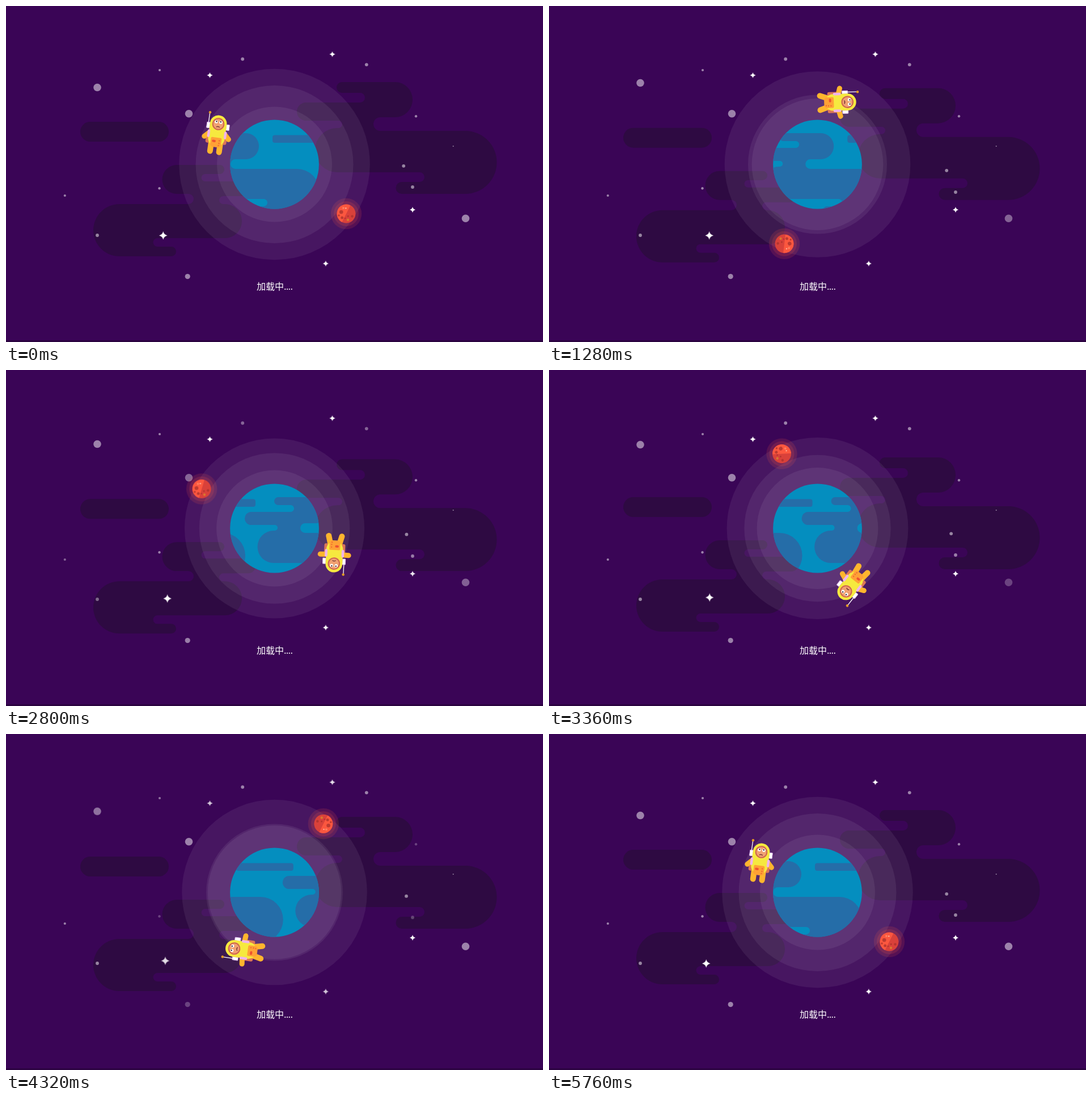
Write an HTML page that moves like this. It is 947 px wide and 592 px high and loops after 5.84 s.

```html
<!DOCTYPE html>
<html lang="zh">
<head>
<meta charset="utf-8">
<title>加载中</title>
<style>
@property --swing { syntax: "<number>"; inherits: true; initial-value: 0; }
:root { --loop: 5760ms linear infinite; }
html, body { margin: 0; width: 100%; height: 100%; overflow: hidden; background: #3a0556; }
svg { display: block; width: 100vw; height: 100vh; }
text { font: 16px "Noto Sans CJK SC", "Noto Sans CJK", "Noto Sans", sans-serif; fill: #fff; }
.dots { letter-spacing: -.65px; }

.clouds { fill: #2e0a42; animation: clouds var(--loop); }
@keyframes clouds {
  0%, 100% { translate: 0 0; }
  50% { translate: 0 24px; }
  0%, 50% { animation-timing-function: cubic-bezier(.37, 0, .63, 1); }
}

.halo { fill: #fff; fill-opacity: .065; }
.outer { animation: outer var(--loop); }
.middle { animation: middle var(--loop); }
.inner { animation: inner var(--loop); }
@keyframes outer {
  0%, 100% { r: 168.3px; }
  50% { r: 158.3px; }
  0%, 50% { animation-timing-function: cubic-bezier(.37, 0, .63, 1); }
}
@keyframes middle {
  0%, 100% { r: 139px; }
  25%, 75% { r: 120.5px; }
  50% { r: 133.5px; }
  0%, 50% { animation-timing-function: ease-in; }
  25%, 75% { animation-timing-function: ease-out; }
}
@keyframes inner {
  0%, 50%, 100% { r: 101.5px; }
  25%, 75% { r: 117.7px; }
  0%, 50% { animation-timing-function: ease-in; }
  25%, 75% { animation-timing-function: ease-out; }
}

.land { fill: #256da8; animation: scroll 5782ms linear infinite; }
@keyframes scroll { to { translate: 254px 0; } }

.orbit, .spin { animation: turn var(--loop); }
.pilot { transform-origin: 473.5px 279px; }
.moon { transform-origin: 476px 282.2px; }
.spin { transform-origin: 600px 366px; }
@keyframes turn { to { rotate: 360deg; } }

.body { animation: swing var(--loop); }
@keyframes swing {
  0%, 100% { --swing: 0; }
  22.2% { --swing: .8; }
  37.5%, 87.5% { --swing: 1; }
  58.3% { --swing: .3; }
  75% { --swing: .52; }
}
.limb { stroke: #ffb52e; stroke-linecap: round; }
.arm { stroke-width: 9; rotate: calc(45deg - 75deg * var(--swing)); }
.leg { stroke-width: 10; rotate: calc(24deg * var(--swing)); }

.dot { fill: #fff; fill-opacity: .5; --low: .5; }
.spark { fill: #fff; --low: .78; }
.a { animation: twice var(--loop); }
.b { animation: once var(--loop); }
.c { animation: thrice var(--loop); }
.d { animation: late var(--loop); }
@keyframes twice {
  0%, 22%, 58%, 75%, 100% { opacity: 1; }
  37.5%, 87.5% { opacity: var(--low); }
}
@keyframes once {
  0%, 22%, 58%, 100% { opacity: 1; }
  37.5%, 87.5% { opacity: .94; }
  75% { opacity: var(--low); }
}
@keyframes thrice {
  0%, 37.5%, 75%, 100% { opacity: 1; }
  22.2% { opacity: .75; }
  58.3%, 87.5% { opacity: var(--low); }
}
@keyframes late {
  0%, 58%, 100% { opacity: 1; }
  75% { opacity: .87; }
  87.5% { opacity: var(--low); }
}
.rise { animation: rise var(--loop); }
.sink { animation: sink var(--loop); }
.loop { animation: loop var(--loop); }
.glide { animation: glide var(--loop); }
@keyframes rise {
  0%, 100% { translate: 0 0; }
  22.2% { translate: 0 -8px; }
  40% { translate: 0 -14px; }
  58.3% { translate: 0 -12px; }
  75% { translate: 0 -7.3px; }
}
@keyframes sink {
  0%, 100% { translate: 0 0; }
  22.2% { translate: 0 9px; }
  37.5% { translate: 0 11px; }
  58.3% { translate: 0 7px; }
}
@keyframes loop {
  0%, 100% { translate: 0 0; }
  22.2% { translate: 0 8px; }
  37.5% { translate: 2px 9.5px; }
  58.3% { translate: 8px 6.5px; }
}
@keyframes glide {
  0%, 100% { translate: 0 0; }
  22.2% { translate: 5.5px 0; }
  37.5% { translate: 9px .5px; }
  58.3% { translate: 6px -3.5px; }
  75% { translate: 3.7px -4.7px; }
}
</style>
</head>
<body>
<svg viewBox="0 0 947 592">
  <defs>
    <clipPath id="globe"><circle cx="473.5" cy="279" r="78.4"/></clipPath>
    <clipPath id="disc"><circle r="16.5"/></clipPath>
    <path id="spark" d="M0-5.2Q.9-.9 5.2 0Q.9.9 0 5.2Q-.9.9-5.2 0Q-.9-.9 0-5.2z"/>
    <path id="land" d="M357 224H423a23 23 0 0 1 0 46H404.5a8.5 8.5 0 0 0 0 17H513a40 40 0 0 1 0 80H434a7 7 0 0 1 0-14H454.5a6.5 6.5 0 0 0 0-13H349a28.5 28.5 0 0 1 0-57H351a5 5 0 0 0 0-10H309.5a11.5 11.5 0 0 1 0-23H379a6 6 0 0 0 0-12H357a7 7 0 0 1 0-14zM474 227.5H567a4 4 0 0 1 4 4V237a4 4 0 0 1-4 4H474a4 4 0 0 1-4-4V231.500a4 4 0 0 1 4-4z"/>
  </defs>

  <rect width="947" height="592" fill="#3a0556"/>
  <rect y="589" width="947" height="3" fill="#2c0441"/>

  <g class="clouds">
    <rect x="131" y="204" width="156" height="35" rx="17.5"/>
    <path d="M592.5 134H686a31 31 0 0 1 0 62H660a12 12 0 0 0 0 24H810a55.500 55.500 0 0 1 0 111H698a10.500 10.500 0 0 1 0-21H729.500a8.500 8.500 0 0 0 0-17H584a39 39 0 0 1 0-78H586.500a6.500 6.500 0 0 0 0-13H529a16 16 0 0 1 0-32H624.500a8.500 8.500 0 0 0 0-17H592.500a9.500 9.500 0 0 1 0-19z"/>
    <path d="M301 280H377a8 8 0 0 1 0 16H351a6.500 6.500 0 0 0 0 13H427a13 13 0 0 1 0 26H383a7 7 0 0 0 0 14H386a30 30 0 0 1 0 60H267a7.500 7.500 0 0 0 0 15H291.500a8.500 8.500 0 0 1 0 17H200a46 46 0 0 1 0-92H322a9 9 0 0 0 0-18H301a25.500 25.500 0 0 1 0-51z"/>
  </g>

  <g class="halo">
    <circle class="outer" cx="473.5" cy="279" r="168.3"/>
    <circle class="middle" cx="473.5" cy="279" r="139"/>
    <circle class="inner" cx="473.5" cy="279" r="101.5"/>
  </g>

  <g class="dot">
    <g class="rise"><circle class="d" cx="161" cy="143.5" r="6.8"/></g>
    <circle class="a" cx="322.5" cy="189.7" r="6.8"/>
    <circle class="d" cx="271" cy="113" r="2.1"/>
    <circle class="a" cx="417.2" cy="93.5" r="2.9"/>
    <circle class="a" cx="635.8" cy="103.3" r="2.9"/>
    <circle class="b" cx="723" cy="194.3" r="2.2"/>
    <circle cx="788.7" cy="247" r="1"/>
    <circle class="loop" cx="701.2" cy="281.8" r="2.9"/>
    <g class="sink"><circle class="b" cx="717" cy="319" r="2.9"/></g>
    <circle class="c" cx="810.5" cy="374.2" r="6.8"/>
    <circle class="b" cx="320.2" cy="476.5" r="4.6"/>
    <circle class="a" cx="161" cy="404" r="2.9"/>
    <circle class="a" cx="103.8" cy="334" r="2.1"/>
    <circle class="b" cx="270.5" cy="321.2" r="2.2"/>
  </g>
  <g class="spark">
    <use class="b" href="#spark" x="359.5" y="122"/>
    <use class="d" href="#spark" x="575.5" y="85"/>
    <use class="a" href="#spark" x="717" y="359"/>
    <use class="b" href="#spark" x="563.8" y="453.8"/>
    <g class="glide"><use class="d" href="#spark" transform="translate(277.2 404.3) scale(1.4)"/></g>
  </g>

  <g clip-path="url(#globe)">
    <rect x="395" y="200" width="158" height="158" fill="#048ebf"/>
    <g class="land">
      <use href="#land"/>
      <use href="#land" x="-254"/>
    </g>
  </g>

  <g class="orbit moon"><g class="spin"><g transform="translate(600 366)">
    <circle r="27.200" fill="#ff5a40" fill-opacity=".14"/>
    <circle r="22" fill="#ff5a40" fill-opacity=".16"/>
    <g clip-path="url(#disc)">
      <circle r="17" fill="#d9413a"/>
      <path d="M9-18L-9 18H-20V-18z" fill="#fb573f"/>
      <g fill="#a8302b" fill-opacity=".75">
        <circle cx="-8.800" cy="-3" r="3.300"/>
        <circle cx="-7.300" cy="7" r="2.500"/>
        <circle cx="3.200" cy="4.300" r="1.500"/>
        <circle cx="10.500" cy="4.500" r="2.200"/>
        <circle cx="-13" cy="3" r="1.700"/>
        <circle cx="-2" cy="8" r="1.300"/>
      </g>
      <circle cx="3" cy="10.700" r="2.200" fill="#d9772f"/>
      <circle cx="-.7" cy="-9.700" r="1.200" fill="#ffb39a"/>
      <circle cx="-5" cy="-10" r="2" fill="#ff7d5c"/>
    </g>
  </g></g></g>

  <g class="orbit pilot"><g class="body" transform="translate(374.500 208) rotate(8)">
    <g fill="#dc7658">
      <rect x="-18.500" y="17" width="8" height="18" rx="3"/>
      <rect x="10.500" y="17" width="8" height="18" rx="3"/>
    </g>
    <g class="limb">
      <g transform="translate(-13 16) scale(-1 1)"><path class="arm" d="M0 0H12"/></g>
      <g transform="translate(13 16)"><path class="arm" d="M0 0H12"/></g>
      <g transform="translate(-8 35)"><path class="leg" d="M0 0V14"/></g>
      <g transform="translate(8 35) scale(-1 1)"><path class="leg" d="M0 0V14"/></g>
    </g>
    <path d="M-17.500 0V-17" stroke="#fff" stroke-width="1.300"/>
    <circle cx="-17.300" cy="-18.500" r="2.300" fill="#e39a25"/>
    <g fill="#fff" stroke="#dcb6ec">
      <rect x="-20" y="-1" width="5.500" height="10" rx="1"/>
      <rect x="14.500" y="-1" width="5.500" height="10" rx="1"/>
    </g>
    <rect x="-14.800" y="-15.500" width="29.600" height="55" rx="14.800" fill="#f6e93f"/>
    <g fill="#f0b4ea">
      <rect x="-17" y="11.500" width="4.500" height="13.500" rx="2.200"/>
      <rect x="12.500" y="11.500" width="4.500" height="13.500" rx="2.200"/>
    </g>
    <path d="M-9.500 26a2 2 0 0 1 2-2H7.500a2 2 0 0 1 2 2V36a5 5 0 0 1-5 5H-4.500a5 5 0 0 1-5-5z" fill="#ffa136"/>
    <rect x="-7" y="28.500" width="6.500" height="4" rx="1.700" fill="#ee5330"/>
    <g fill="#ee6a30">
      <circle cx="5.700" cy="29" r="1.200"/>
      <circle cx="5.700" cy="33.500" r="1.200"/>
      <circle cx="5.200" cy="37.500" r="1.200"/>
    </g>
    <circle r="10.800" fill="#cf6450"/>
    <circle r="8.800" fill="#f0a172"/>
    <g fill="#fff">
      <circle cx="-4" cy="-3.500" r="2.800"/>
      <circle cx="4" cy="-3.500" r="2.800"/>
    </g>
    <g fill="#2b1a26">
      <circle cx="-3.700" cy="-4.300" r="1.200"/>
      <circle cx="3.700" cy="-4.300" r="1.200"/>
    </g>
    <path d="M-2.500 5.300Q0 3.600 2.500 5.300" fill="none" stroke="#6b2f30" stroke-width="1.300" stroke-linecap="round"/>
  </g></g>

  <text x="442" y="499.500">加载中<tspan class="dots">....</tspan></text>
</svg>
<script>
// The motion advances in held steps rather than continuously.
const STEP = 80, LOOP = 5840;
const parts = document.getAnimations();
const start = performance.now();
parts.forEach(part => part.pause());

function tick() {
  const time = Math.floor((performance.now() - start) % LOOP / STEP) * STEP;
  for (const part of parts) part.currentTime = time;
  requestAnimationFrame(tick);
}
tick();
</script>
</body>
</html>
```
